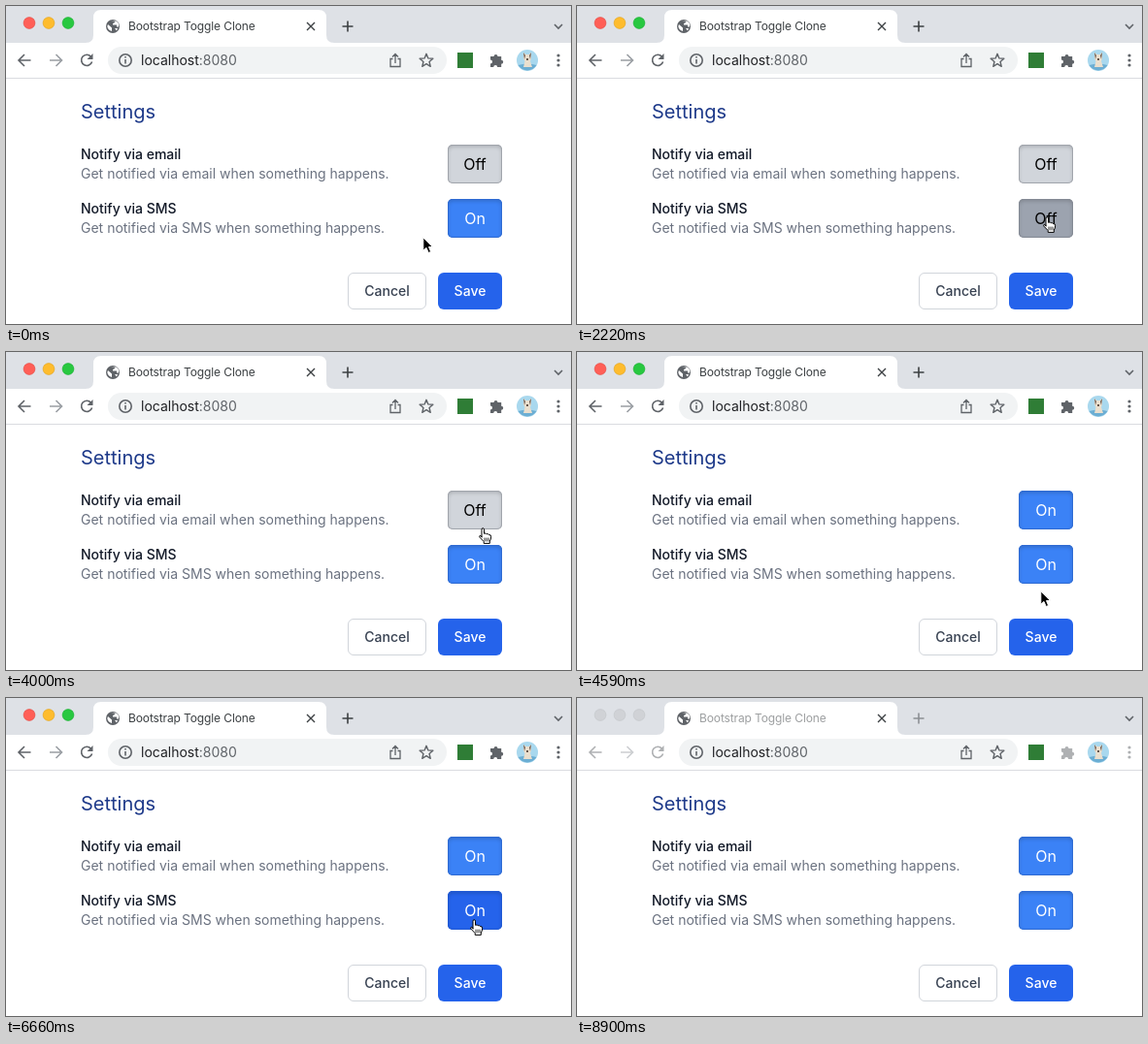
Recreate the animation shown at these times as an HTML page. Size 582 px wide and 328 px high, loop 9000 ms.

```html
<!DOCTYPE html>
<html lang="en">
<head>
<meta charset="utf-8">
<title>Toggle settings</title>
<style>
  html, body { margin: 0; width: 100%; height: 100%; overflow: hidden; background: #fff; }
  #stage { position: absolute; left: 0; top: 0; width: 582px; height: 328px; overflow: hidden; font: 14px Inter, sans-serif; }
  #stage > svg { position: absolute; left: 0; top: 0; }
  .button { position: absolute; box-sizing: border-box; text-align: center; }
  .toggle { left: 455px; width: 56px; height: 40px; border-radius: 5px; font-size: 16px; line-height: 40px; }
  .action { top: 275px; height: 38px; border-radius: 6px; font-weight: 500; line-height: 38px; }
  #email { top: 143px; }
  #sms { top: 199px; }
  #cancel { left: 352px; width: 81px; border: 1px solid #d1d5db; color: #374151; line-height: 36px; }
  #save { left: 445px; width: 66px; color: #fff; }
  .title { font-weight: 500; fill: #111827; }
  .note { fill: #6b7280; }
  .icon { fill: none; stroke: #5f6368; stroke-width: 1.6; }
  .solid { fill: #5f6368; }
  .inactive .fades { opacity: .5; }
  .inactive .light { fill: #d0d2d6; stroke: #c2c4c8; }
</style>
</head>
<body>
<div id="stage">
  <svg id="chrome" width="582" height="328">
    <rect width="582" height="38" fill="#dee1e6"/>
    <path d="M82 38q8 0 8-8V12q0-8 8-8H322q8 0 8 8V30q0 8 8 8Z" fill="#fff"/>
    <path d="M0 74.5H582" stroke="#dadce0"/>
    <g stroke-width=".6">
      <circle class="light" cx="24" cy="17.5" r="5.9" fill="#ff5f57" stroke="#e2463f"/>
      <circle class="light" cx="44" cy="17.5" r="5.9" fill="#febc2e" stroke="#e1a116"/>
      <circle class="light" cx="64" cy="17.5" r="5.9" fill="#28c840" stroke="#14ae2c"/>
    </g>

    <g id="globe">
      <circle class="solid" cx="110" cy="21" r="7"/>
      <path d="M105 19l4 3.5v3.5q-4-1-4.7-5zM108 15.4l4-.4v2l-2 1v1.6h4v2h2q1-4-2.5-6M112 23h3l-1 2.5z" fill="#fff"/>
    </g>
    <path id="spinner" class="icon" d="M110 14.8a6.2 6.2 0 1 1-6.2 6.2"/>
    <text class="fades" x="126" y="25" font-size="12" letter-spacing="-.12" fill="#3c4043">Bootstrap Toggle Clone</text>
    <path class="icon" style="stroke:#3c4043;stroke-width:1.4" d="M310 17l8 8m0-8l-8 8"/>
    <path class="icon fades" style="stroke:#3c4043" d="M352 15.500v11m-5.500-5.500h11"/>
    <path class="icon" d="M565 19l4 4 4-4"/>

    <path class="icon fades" d="M25.500 56H13m6-6l-6 6 6 6"/>
    <path class="icon fades" style="stroke:#9a9ea3" d="M45 56h12.500m-6-6l6 6-6 6"/>
    <g id="reload" class="fades">
      <path class="icon" d="M87.500 52.200A5.600 5.600 0 1 0 88.600 57.500"/>
      <path class="solid" d="M89.500 49v6h-6z"/>
    </g>
    <path id="stop" class="icon" d="M78 51l10 10m0-10l-10 10"/>

    <rect x="105" y="42" width="349" height="28" rx="14" fill="#f1f3f4"/>
    <circle class="icon" cx="123" cy="56" r="6.200" stroke-width="1.400"/>
    <path class="icon" d="M123 55v4.500m0-7.500v1.600"/>
    <text x="139" y="61" fill="#202124">localhost<tspan fill="#5f6368">:8080</tspan></text>
    <path class="icon" style="stroke-width:1.300" d="M398.500 54.500H396V62.500H406V54.500H403.500M401 59V49.500m-3 3l3-3 3 3"/>
    <path id="star" class="icon" style="stroke-width:1.400;stroke-linejoin:round"/>
    <rect x="465" y="48" width="16" height="16" fill="#2f7d36"/>
    <path class="solid fades" d="M499 52h3.500a2 2 0 1 1 4 0h3.700v3.800a2 2 0 1 1 0 4V63h-4a2 2 0 0 0-4 0H499v-3.600a2 2 0 0 0 0-4z"/>
    <circle cx="537" cy="56" r="11" fill="#a9d8ee"/>
    <path d="M527.500 61q9.500-3 19 0a11 11 0 0 1-19 0z" fill="#6caed3"/>
    <path d="M533 48l2.500 2h3l2.500-2v6l-1 3 2 6h-9l1.500-6-1.500-3z" fill="#eadfce"/>
    <path d="M533 48l2 3-1 4zm8 0l-2 3 1 4zM536 54h2v2h-2z" fill="#65564d"/>
    <g class="solid fades"><circle cx="569" cy="51" r="1.600"/><circle cx="569" cy="56" r="1.600"/><circle cx="569" cy="61" r="1.600"/></g>

    <text x="77" y="116" font-size="20" fill="#1e3a8a">Settings</text>
    <text class="title" x="77" y="158">Notify via email</text>
    <text class="note" x="77" y="178">Get notified via email when something happens.</text>
    <text class="title" x="77" y="214">Notify via SMS</text>
    <text class="note" x="77" y="234">Get notified via SMS when something happens.</text>
  </svg>

  <div id="email" class="button toggle"></div>
  <div id="sms" class="button toggle"></div>
  <div id="cancel" class="button action">Cancel</div>
  <div id="save" class="button action">Save</div>

  <svg width="582" height="328">
    <path id="arrow" d="M.8.8V14.200L4 11.400 6.200 16.500 8.600 15.500 6.500 10.500H10.500Z" fill="#000" stroke="#fff"/>
    <g id="hand" stroke="#000" stroke-linejoin="round" stroke-linecap="round">
      <path d="M3 9.800V2.200Q3 .7 4.200 .7T5.500 2.200V6.300Q7.700 5.300 8.100 6.800 10 6.100 10.400 7.600 12.700 7.200 12.600 9.300 12.700 12.500 11.300 14V16.400H5.200V14.600L1 10.200Q.2 8.800 1.200 8.300T3 9.800Z" fill="#fff"/>
      <path d="M6 11v3m2-3v3m2-3v3" fill="none" stroke-width=".8"/>
    </g>
  </svg>
</div>
<script>
const LOOP = 9000;
const $ = id => document.getElementById(id);

// Toggle looks: label, fill, edge
const looks = {
  off: ['Off', '#d1d5db', '#a1a5ac'],
  offWarm: ['Off', '#b7bcc5', '#90959d'],
  offHover: ['Off', '#9ca3af', '#848a94'],
  turningOff: ['Off', '#7d93bd', '#7082a6'],
  on: ['On', '#3b82f6', '#2f6bd3'],
  onWarm: ['On', '#3073f1', '#2863d3'],
  onHover: ['On', '#2563eb', '#2059d4'],
};

// Each track lists [start in ms, value...]
const tracks = {
  email: [[0, 'off'], [4150, 'offHover'], [4300, 'onWarm'], [4450, 'onHover'], [4590, 'on']],
  sms: [
    [0, 'on'], [740, 'onWarm'], [890, 'onHover'], [1930, 'turningOff'], [2070, 'offHover'],
    [2370, 'onWarm'], [2520, 'onHover'], [2670, 'on'], [3860, 'onWarm'], [4000, 'on'],
    [6520, 'onWarm'], [6660, 'onHover'], [6960, 'onWarm'], [7110, 'on'],
  ],
  save: [
    [0, 'idle'], [2810, 'hover'], [3260, 'focus'], [3410, 'hover'], [3710, 'idle'],
    [4740, 'hover'], [4890, 'focus'], [5330, 'hover'], [6370, 'idle'],
  ],
  loading: [[0, false], [3260, true], [3410, false]],
  inactive: [[0, false], [8900, true]],
  cursor: [
    [0, 'arrow', 429, 238], [590, 'arrow', 439, 237], [740, 'hand', 470, 228],
    [890, 'hand', 500, 225], [1040, 'hand', 483, 223], [1190, 'hand', 481, 220],
    [1330, 'hand', 480, 218], [1480, 'hand', 480, 217], [2520, 'hand', 479, 222],
    [2670, 'arrow', 476, 252], [2810, 'hand', 470, 286], [2960, 'hand', 467, 295],
    [3710, 'arrow', 476, 256], [3860, 'hand', 486, 213], [4000, 'hand', 487, 181],
    [4150, 'hand', 483, 170], [4590, 'arrow', 477, 246], [4740, 'hand', 468, 290],
    [4890, 'hand', 467, 295], [6220, 'hand', 469, 286], [6370, 'arrow', 476, 257],
    [6520, 'hand', 479, 233], [6660, 'hand', 478, 228], [6960, 'arrow', 479, 245],
    [7110, 'arrow', 477, 254], [8000, 'arrow', 488, 272], [8150, 'arrow', 516, 307],
    [8300, 'none', 0, 0],
  ],
};

const at = (name, time) => tracks[name].findLast(step => step[0] <= time).slice(1);
const show = (id, visible) => { $(id).style.display = visible ? '' : 'none'; };

function paintToggle(id, look) {
  const [label, fill, edge] = looks[look];
  const el = $(id);
  if (el.textContent !== label) el.textContent = label;
  el.style.color = label === 'On' ? '#fff' : '#000';
  el.style.background = fill;
  el.style.boxShadow = `inset 0 0 0 1px ${edge}, inset 0 2px 4px rgba(0,0,0,.2)`;
}

function paint(time) {
  paintToggle('email', at('email', time)[0]);
  paintToggle('sms', at('sms', time)[0]);

  const [save] = at('save', time);
  $('save').style.background = save === 'idle' ? '#2563eb' : '#1d56dd';
  $('save').style.boxShadow = save === 'focus' ? '0 0 0 2px #fff, 0 0 0 4px #3b82f6' : 'none';

  const [loading] = at('loading', time);
  for (const id of ['spinner', 'stop']) show(id, loading);
  for (const id of ['globe', 'reload']) show(id, !loading);
  $('chrome').classList.toggle('inactive', at('inactive', time)[0]);

  const [kind, x, y] = at('cursor', time);
  for (const id of ['arrow', 'hand']) {
    show(id, id === kind);
    $(id).setAttribute('transform', `translate(${x} ${y})`);
  }
}

const starPoints = Array.from({ length: 10 }, (_, i) => {
  const angle = i * Math.PI / 5, radius = i % 2 ? 3.2 : 7.2;
  return `${433 + radius * Math.sin(angle)} ${56.5 - radius * Math.cos(angle)}`;
});
$('star').setAttribute('d', `M${starPoints.join('L')}Z`);

const start = performance.now();
function tick() {
  paint((performance.now() - start) % LOOP);
  requestAnimationFrame(tick);
}
tick();
</script>
</body>
</html>
```
